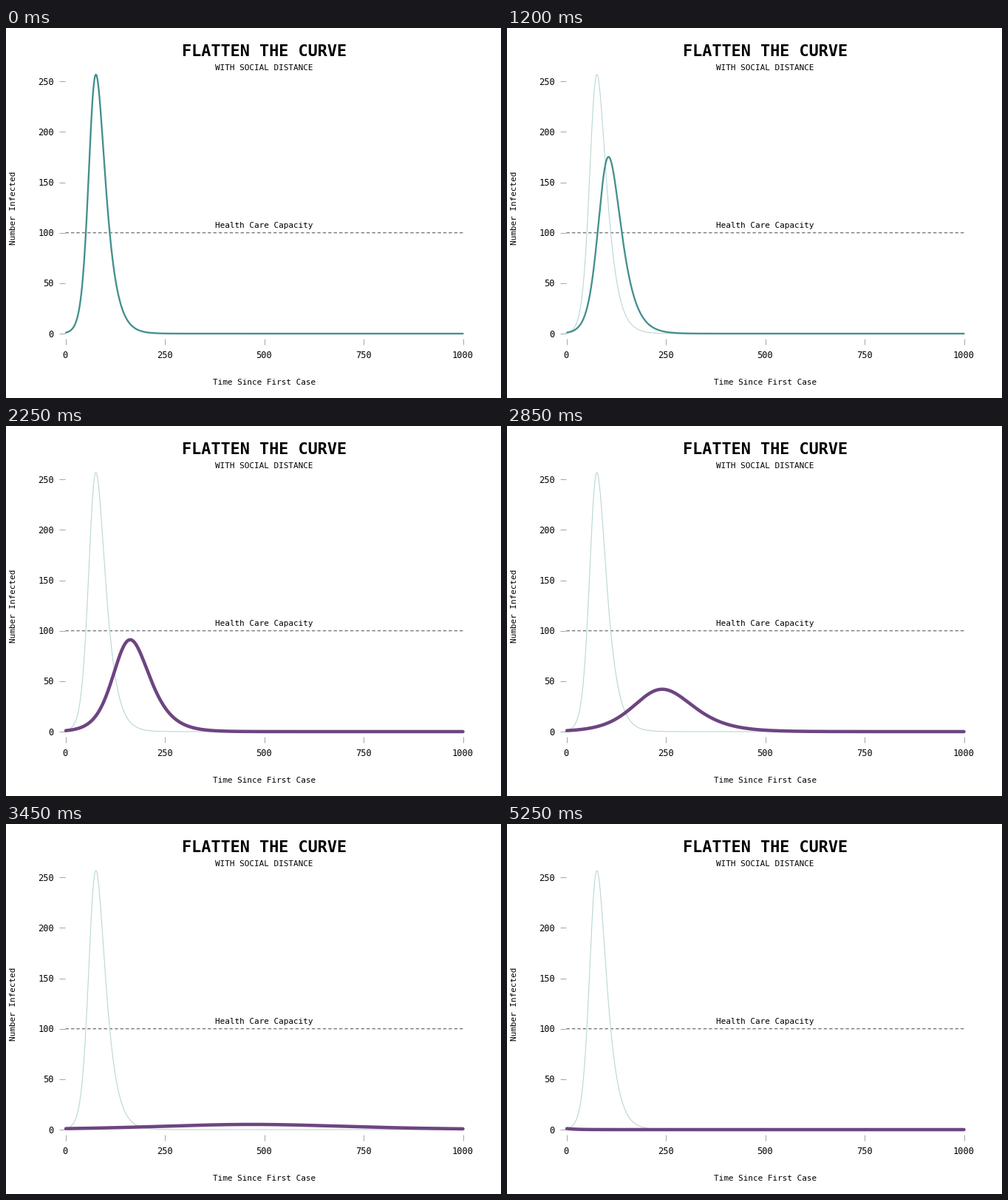
Recreate the animation shown at these times as a matplotlib script. Size 670 by 500 pixels, loop 5.4 s.

```python
import numpy as np
import matplotlib.pyplot as plt
from matplotlib.animation import FuncAnimation

W, H, DPI = 670, 500, 100
PT = 72 / DPI                 # points per pixel
FRAMES, STEP_MS = 36, 150
TEAL, PURPLE, GHOST = "#448f8f", "#6d4580", "#b9d6d6"
CAPACITY = 100

# Day-by-day SIR model, solved for every contact level at once
POP, DAYS = 1000, 1000
level = np.arange(FRAMES)
r0 = 2.6615 - 0.0665 * level - 0.000061 * level ** 2
gamma = 0.0615 - 0.00017 * level
beta = gamma * r0


def infected():
    s, i = np.full(FRAMES, POP - 1.0), np.ones(FRAMES)
    days = []
    for _ in range(DAYS):
        days.append(i)
        left = s * np.exp(-beta * i / POP)
        s, i = left, i + (s - left) - gamma * i
    return np.array(days).T


def px(day):
    return 80.5 + 0.538 * day


def py(count):
    return 413 - 1.363 * count


plt.rcParams["font.family"] = "DejaVu Sans Mono"
fig = plt.figure(figsize=(W / DPI, H / DPI), dpi=DPI, facecolor="white")
ax = fig.add_axes([0, 0, 1, 1])
ax.set_xlim(0, W)
ax.set_ylim(H, 0)
ax.axis("off")


def label(x, y, text, size=10.96, ha="center", **kw):
    kw.setdefault("va", "baseline")
    ax.text(x, y, text, fontsize=size * PT, ha=ha, color="black", **kw)


def stroke(xs, ys, color, width, **kw):
    return ax.plot(xs, ys, color=color, lw=width * PT, **kw)[0]


label(349.2, 38.5, "FLATTEN THE CURVE", 21.85, weight="bold")
label(349, 57.3, "WITH SOCIAL DISTANCE")
label(349, 270.3, "Health Care Capacity")
label(349.3, 482.3, "Time Since First Case")
label(10, 243, "Number Infected", rotation=90, va="center")

for n in range(0, 251, 50):
    stroke([72, 80], [py(n)] * 2, "#a6a6a6", 1, solid_capstyle="butt")
    label(65, py(n) + 4.5, str(n), 11.96, ha="right")
for d in range(0, 1001, 250):
    stroke([px(d)] * 2, [419.5, 427.5], "#a6a6a6", 1, solid_capstyle="butt")
    label(px(d) - 0.4, 446, str(d), 11.96)

stroke([px(0), px(DAYS)], [py(CAPACITY)] * 2, "#75727a", 1.3,
       dashes=(3.4, 2.3), dash_capstyle="butt", snap=False)

curves = infected()
xs = px(np.arange(1, DAYS + 1))
stroke(xs, py(curves[0]), GHOST, 1.1, zorder=3)
curve = stroke(xs, py(curves[0]), TEAL, 2.3, zorder=4,
               solid_capstyle="round", solid_joinstyle="round")


def update(k):
    safe = curves[k].max() < CAPACITY
    curve.set_ydata(py(curves[k]))
    curve.set_color(PURPLE if safe else TEAL)
    curve.set_linewidth((4.5 if safe else 2.3) * PT)
    return curve,


anim = FuncAnimation(fig, update, frames=FRAMES, interval=STEP_MS,
                     repeat=True, repeat_delay=0, blit=False)
plt.show()
```
